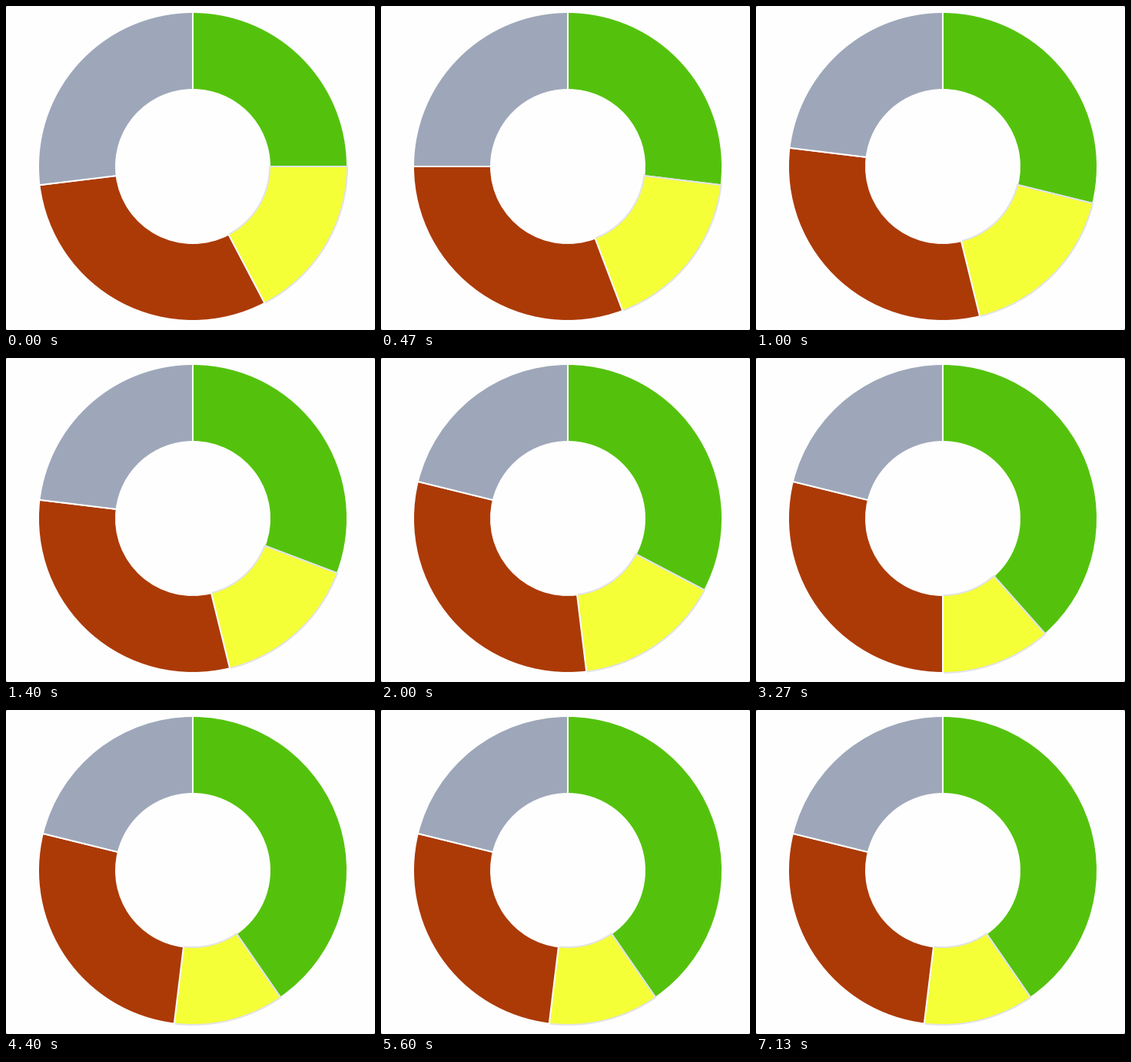
Write a matplotlib script that moves like this. It is 480x422 px and loops after 7.27 s.

```python
import matplotlib.pyplot as plt
from matplotlib.animation import FuncAnimation
from matplotlib.patches import FancyBboxPatch, Wedge

W, H, DPI = 480, 422, 64
LOOP_MS, FRAMES = 7270, 109
PX = 72 / DPI

GREEN, YELLOW, RUST, GREY = range(4)
FILLS = ["#54c20d", "#f5ff37", "#ab3a07", "#9ea7b9"]
EDGES = ["#fefefe", "#e2e3e6", "#fefefe", "#fefefe"]
START = [13, 9, 16, 14]

# Every tick one unit passes from the listed slice to green.
DONORS = [GREY, GREY, YELLOW, GREY, YELLOW, YELLOW, RUST, None, RUST]
FIRST_TICK, TICK = 6, 7

CENTER = (243, H - 209)
OUTER, INNER = 201, 100

fig = plt.figure(figsize=(W / DPI, H / DPI), dpi=DPI, facecolor="#7c7c7c")
ax = fig.add_axes([0, 0, 1, 1])
ax.set(xlim=(0, W), ylim=(0, H))
ax.axis("off")
ax.add_patch(FancyBboxPatch((0, 0), W, H, boxstyle="round,pad=0,rounding_size=2.5",
                            fc="#fefefe", ec="none"))

slices = [
    ax.add_patch(Wedge(CENTER, OUTER, 0, 90, width=OUTER - INNER,
                       fc=fill, ec=edge, lw=2 * PX, zorder=2 + i))
    for i, (fill, edge) in enumerate(zip(FILLS, EDGES))
]


def counts_at(frame):
    counts = START.copy()
    ticks = max(0, (frame - FIRST_TICK) // TICK + 1)
    for donor in DONORS[:ticks]:
        if donor is not None:
            counts[donor] -= 1
            counts[GREEN] += 1
    return counts


def draw(frame):
    counts = counts_at(frame)
    unit = 360 / sum(counts)
    angle = 90
    for wedge, n in zip(slices, counts):
        wedge.set_theta1(angle - n * unit)
        wedge.set_theta2(angle)
        angle -= n * unit
    return slices


anim = FuncAnimation(fig, draw, frames=FRAMES, interval=LOOP_MS / FRAMES,
                     repeat=True, repeat_delay=0, blit=False)
plt.show()
```
